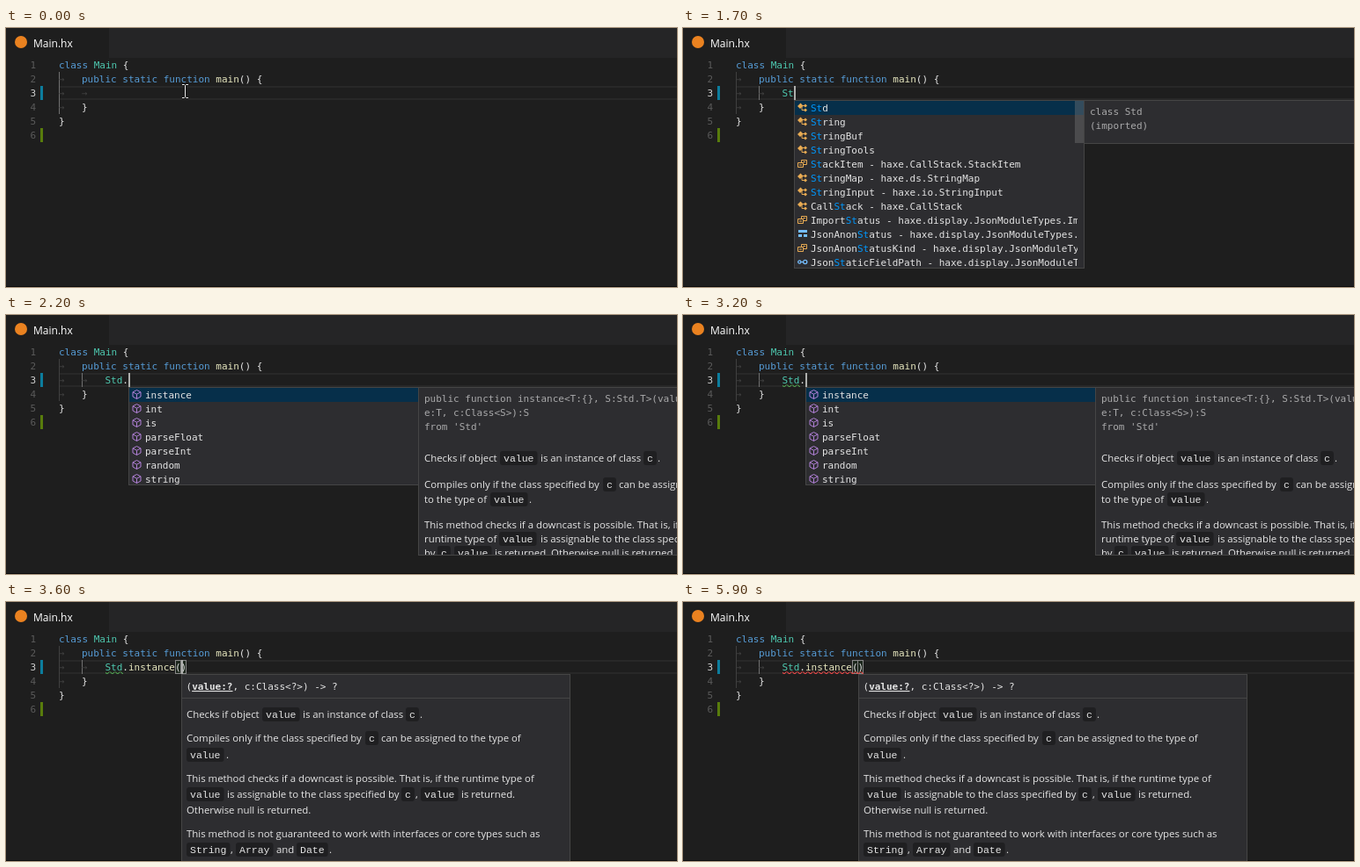
Animation, 762 px wide and 295 px high, one loop 6.1 s. Source, as an HTML page:

```html
<!DOCTYPE html>
<html lang="en">
<head>
<meta charset="utf-8">
<title>Code completion</title>
<style>
  html, body { margin: 0; width: 100%; height: 100%; overflow: hidden; background: #1e1e1e; }
  #stage { display: block; width: 762px; height: 295px; }
  text { font: 11px "DejaVu Sans Mono", monospace; fill: #e4e4e4; white-space: pre; }
  .kw { fill: #569cd6; }
  .type { fill: #4ec9b0; }
  .fn { fill: #e8e8c0; }
  .var { fill: #9cdcfe; }
  .hit { fill: #0097fb; }
  .num { fill: #5a5a5a; text-anchor: end; }
  .now { fill: #d0d0d0; }
  .space { fill: #404040; }
  .dim { fill: #a9a9aa; }
  .arg { font-weight: bold; text-decoration: underline; }
  .ui { font: 11.4px "Open Sans", "Noto Sans", sans-serif; fill: #e6e6e6; }
  .tab { font-size: 12px; fill: #fff; }
  .code { font: 11.5px "Liberation Mono", monospace; }
  .box { fill: #2d2d30; stroke: #454545; }
  .chip { fill: #1f1f21; }
  .match { fill: rgba(0, 100, 0, .1); stroke: #888; }
</style>
</head>
<body>
<svg id="stage" viewBox="0 0 762 295">
  <defs>
    <path id="wave" d="M5.5 0 2.5 3H1.1L4.1 0ZM4 0 6 2V.6L5.4 0ZM0 2 1 3H2.4L0 .6Z"/>
    <pattern id="warn" width="6" height="3" x="113" y="79" patternUnits="userSpaceOnUse">
      <use href="#wave" fill="#4d9e4d"/>
    </pattern>
    <pattern id="error" width="6" height="3" x="113" y="79" patternUnits="userSpaceOnUse">
      <use href="#wave" fill="#ea4646"/>
    </pattern>
    <g id="c">
      <path d="M3 3.5H8M5 4V8.5H8" fill="none" stroke="#e8ab53"/>
      <path d="M3.5.5 6.5 3.5 3 7 0 4ZM9 1.5 11 3.5 9 5.5 7 3.5ZM9 6.5 11 8.5 9 10.5 7 8.5Z" fill="#e8ab53"/>
    </g>
    <g id="e" fill="none" stroke="#e8ab53">
      <path d="M4.5 4V1.5H10.5V6.5H7M.5 4.5H6.5V9.5H.5ZM2 7H5M6.5 3.5H9"/>
    </g>
    <g id="s" fill="#75beff">
      <path d="M1 1H11V4H1ZM1 6H5V9H1ZM7 6H11V9H7Z"/>
    </g>
    <g id="i" fill="none" stroke="#75beff" stroke-width="1.3">
      <circle cx="2.3" cy="5.5" r="1.6"/><circle cx="8.7" cy="5.5" r="2.1"/><path d="M4 5.5H6.5"/>
    </g>
    <g id="m" fill="none" stroke="#b180d7">
      <path d="M5.5.5 10 2.8V8L5.5 10.5 1 8V2.8ZM1 2.8 5.5 5.2 10 2.8M5.5 5.2V10.5"/>
    </g>
    <path id="beam" fill="none" d="M-3.5-7.5H-1L0-6.5 1-7.5H3.5M0-6.5V6.5M-3.5 7.5H-1L0 6.5 1 7.5H3.5"/>
  </defs>
</svg>
<script>
const LOOP = 6100, CHAR = 6.62, ROW = 16;
const stage = document.getElementById('stage');

const rect = (x, y, w, h, fill) => `<rect x="${x}" y="${y}" width="${w}" height="${h}" fill="${fill}"/>`;
const box = (x, y, w, h, cls = 'box') =>
  `<rect class="${cls}" x="${x + .5}" y="${y + .5}" width="${w - 1}" height="${h - 1}"/>`;
const text = (x, y, str, cls = '') => `<text x="${x}" y="${y}" class="${cls}">${str}</text>`;
const span = (cls, str) => `<tspan class="${cls}">${str}</tspan>`;
const during = (times, body) => `<g data-on="${times}" visibility="hidden">${body}</g>`;
const baseline = line => 30 + ROW * line;
const caretX = n => Math.round(113 + CHAR * n);

// Prose with inline code: parts are [x, text], code is written in backticks.
const prose = (mid, parts) => parts.map(([x, str]) => {
  if (str[0] !== '`') return text(x, mid + 4, str, 'ui');
  const code = str.slice(1, -1);
  return `<rect class="chip" rx="3" x="${x}" y="${mid - 8}" width="${code.length * 6.9 + 8}" height="16"/>` +
    text(x + 4, mid + 4, code, 'code');
}).join('');

// Each item is an icon letter, a space and a label with [matched] letters.
function list(x, items, thumb) {
  const rows = items.map((item, n) => {
    const label = item.slice(2).replace(/\[(\w+)\]/g, (_, hit) => span('hit', hit));
    return `<use href="#${item[0]}" x="4" y="${n * ROW + 3}"/>` + text(19, n * ROW + 13, label);
  }).join('');
  const h = items.length * ROW;
  return box(x, 82, 330, h) + rect(x + 1, 83, 328, ROW, '#062f4a') +
    `<svg x="${x}" y="82" width="322" height="${h - 1}">${rows}</svg>` +
    (thumb ? rect(x + 319, 83, 10, thumb, '#797979" fill-opacity=".4') : '');
}

const suggest = (n, items, thumb) => {
  const x = caretX(n);
  return box(x + 329, 82, 500, 50) + list(x, items, thumb) +
    text(x + 336, 99, 'class Std', 'dim') + text(x + 336, 115, '(imported)', 'dim');
};

const json = 'haxe.display.JsonModuleTypes.';
const disp = json.replace('d', '[d]');
const forS = ['c [S]td', 'c [S]tring', 'c [S]tringBuf', 'c [S]tringTools', 'c [S]ys',
  'e [S]tackItem - haxe.CallStack.StackItem', 'c [S]tringMap - haxe.ds.StringMap',
  'c [S]tringInput - haxe.io.StringInput', 'c [S]erializer - haxe.Serializer',
  'c [S]ha1 - haxe.crypto.Sha1', 'c [S]ocket - sys.net.Socket', 'c [S]qlite - sys.db.Sqlite'];
const forSt = ['c [St]d', 'c [St]ring', 'c [St]ringBuf', 'c [St]ringTools',
  'e [St]ackItem - haxe.CallStack.StackItem', 'c [St]ringMap - haxe.ds.StringMap',
  'c [St]ringInput - haxe.io.StringInput', 'c Call[St]ack - haxe.CallStack',
  `e Import[St]atus - ${json}ImportStatus`, `s JsonAnon[St]atus - ${json}JsonAnonStatus`,
  `e JsonAnon[St]atusKind - ${json}JsonAnonStatusKind`,
  `i Json[St]aticFieldPath - ${json}JsonStaticFieldPath`];
const forStd = ['c [Std]', 'c [St]ringMap - haxe.[d]s.StringMap', 'c Generic[St]ack - haxe.[d]s.GenericStack',
  `e Import[St]atus - ${disp}ImportStatus`, `s JsonAnon[St]atus - ${disp}JsonAnonStatus`,
  `e JsonAnon[St]atusKin[d] - ${json}JsonAnonStatusKind`, 'c [S]qli[t]e - sys.[d]b.Sqlite',
  `i Json[St]aticFiel[d]Path - ${json}JsonStaticFieldPath`, 'c [S]ocke[t]Han[d]le - sys.net.Socket.SocketHandle',
  'i Result[S]e[t] - sys.[d]b.ResultSet', 'c Array[S]or[t] - haxe.[d]s.ArraySort',
  'c List[S]or[t] - haxe.[d]s.ListSort'];
const fields = ['instance', 'int', 'is', 'parseFloat', 'parseInt', 'random', 'string'].map(f => 'm ' + f);

function editor() {
  const nums = [1, 2, 3, 4, 5, 6].map(n => text(34, baseline(n), n, n === 3 ? 'num now' : 'num')).join('');
  const arrows = [2, 3, 4].map(n => text(60, baseline(n), '→', 'space')).join('');
  return rect(117, 0, 645, 34, '#252526') +
    '<circle cx="17" cy="16" r="7" fill="#ea8220"/>' + text(31, 22, 'Main.hx', 'ui tab') +
    rect(60, 66, 702, 2, '#282828') + rect(60, 80, 702, 2, '#282828') +
    rect(39, 66, 3, 16, '#0c7d9d') + rect(39, 114, 3, 16, '#587c0c') +
    during('0-1300', rect(60, 50, 1, 48, '#707070')) +
    during('1300-6100', rect(60, 50, 1, 48, '#404040') + rect(86, 66, 1, 16, '#707070')) +
    nums + arrows + text(86, baseline(3), '→', 'space') +
    text(60, baseline(1), `${span('kw', 'class')} ${span('type', 'Main')} {`) +
    text(86, baseline(2), `${span('kw', 'public static function')} ${span('fn', 'main')}() {`) +
    text(86, baseline(4), '}') + text(60, baseline(5), '}') +
    rect(0, 294, 762, 1, '#0c0c0c');
}

function typing() {
  const line = str => text(112.4, baseline(3), str);
  const std = span('type', 'Std');
  return during('1300-1700', line(span('var', 'S'))) +
    during('1700-1800', line(span('type', 'St'))) +
    during('1800-2100', line(std)) +
    during('2100-3500', line(std + '.')) +
    during('3600-6100', box(192, 66, 7, 16, 'match') + box(198, 66, 7, 16, 'match')) +
    during('3500-6100', line(`${std}.${span('fn', 'instance')}()`)) +
    during('3200-4500', rect(113, 79, 20, 3, 'url(#warn)')) +
    during('4500-6100', rect(113, 79, 92, 3, 'url(#error)'));
}

function fieldDocs() {
  const sig = ['public function instance&lt;T:{}, S:Std.T&gt;(valu', 'e:T, c:Class&lt;S&gt;):S', "from 'Std'"];
  return box(468, 82, 500, 192) + sig.map((s, n) => text(475, 99 + n * ROW, s, 'dim')).join('') +
    '<svg width="762" height="273">' +
    prose(163, [[475, 'Checks if object'], [561, '`value`'], [607, 'is an instance of class'], [724, '`c`'], [740, '.']]) +
    prose(193, [[475, 'Compiles only if the class specified by'], [678, '`c`'], [696, 'can be assigned']]) +
    prose(210, [[475, 'to the type of'], [550, '`value`'], [594, '.']]) +
    prose(239, [[475, 'This method checks if a downcast is possible. That is, if the']]) +
    prose(255, [[475, 'runtime type of'], [560, '`value`'], [607, 'is assignable to the class specified']]) +
    prose(271, [[475, 'by'], [490, '`c`'], [505, ','], [509, '`value`'], [555, 'is returned. Otherwise null is returned.']]) +
    '</svg>';
}

function signature() {
  return box(199, 82, 442, 240) + rect(200, 109, 440, 1, '#454545') +
    text(204.5, 100, `(${span('arg', 'value:?')}, c:Class&lt;?&gt;) -&gt; ?`) +
    prose(128, [[205, 'Checks if object'], [291, '`value`'], [337, 'is an instance of class'], [454, '`c`'], [470, '.']]) +
    prose(155, [[205, 'Compiles only if the class specified by'], [408, '`c`'], [426, 'can be assigned to the type of']]) +
    prose(174, [[205, '`value`'], [250, '.']]) +
    prose(201, [[205, 'This method checks if a downcast is possible. That is, if the runtime type of']]) +
    prose(219, [[205, '`value`'], [251, 'is assignable to the class specified by'], [449, '`c`'], [465, ','],
      [471, '`value`'], [517, 'is returned.']]) +
    prose(237, [[205, 'Otherwise null is returned.']]) +
    prose(264, [[205, 'This method is not guaranteed to work with interfaces or core types such as']]) +
    prose(282, [[205, '`String`'], [255, ','], [261, '`Array`'], [307, 'and'], [330, '`Date`'], [367, '.']]);
}

const caret = (times, n) => during(times, rect(caretX(n), 66, 2, 16, '#aeafad'));
const mouse = (times, x, y) => during(times,
  `<g transform="translate(${x} ${y})"><use href="#beam" stroke="#111" stroke-width="2.4"/>` +
  '<use href="#beam" stroke="#eee"/></g>');

stage.insertAdjacentHTML('beforeend', editor() + typing() +
  during('1300-1700', suggest(1, forS, 24)) +
  during('1700-1800', suggest(2, forSt, 48)) +
  during('1800-2100', suggest(3, forStd, 121)) +
  during('2100-2200', suggest(4, forStd, 121)) +
  during('2200-3500', fieldDocs() + list(caretX(4), fields)) +
  during('3600-6100', signature()) +
  caret('500-1000', 0) + caret('1300-1700', 1) + caret('1700-1800', 2) + caret('1800-2100', 3) +
  caret('2100-2600 3100-3500', 4) + caret('3500-4000 4500-5000 5500-5900', 13) +
  mouse('0-500', 203.5, 72) + mouse('500-600', 300.5, 88) + mouse('600-700', 475.5, 122) +
  mouse('4500-4600', 655.5, 280));

const parts = [...stage.querySelectorAll('[data-on]')].map(el => ({
  el, spans: el.dataset.on.split(' ').map(s => s.split('-').map(Number))
}));

function draw() {
  const t = performance.now() % LOOP;
  for (const { el, spans } of parts) {
    const on = spans.some(([from, to]) => t >= from && t < to);
    el.setAttribute('visibility', on ? 'visible' : 'hidden');
  }
  requestAnimationFrame(draw);
}
draw();
</script>
</body>
</html>
```
